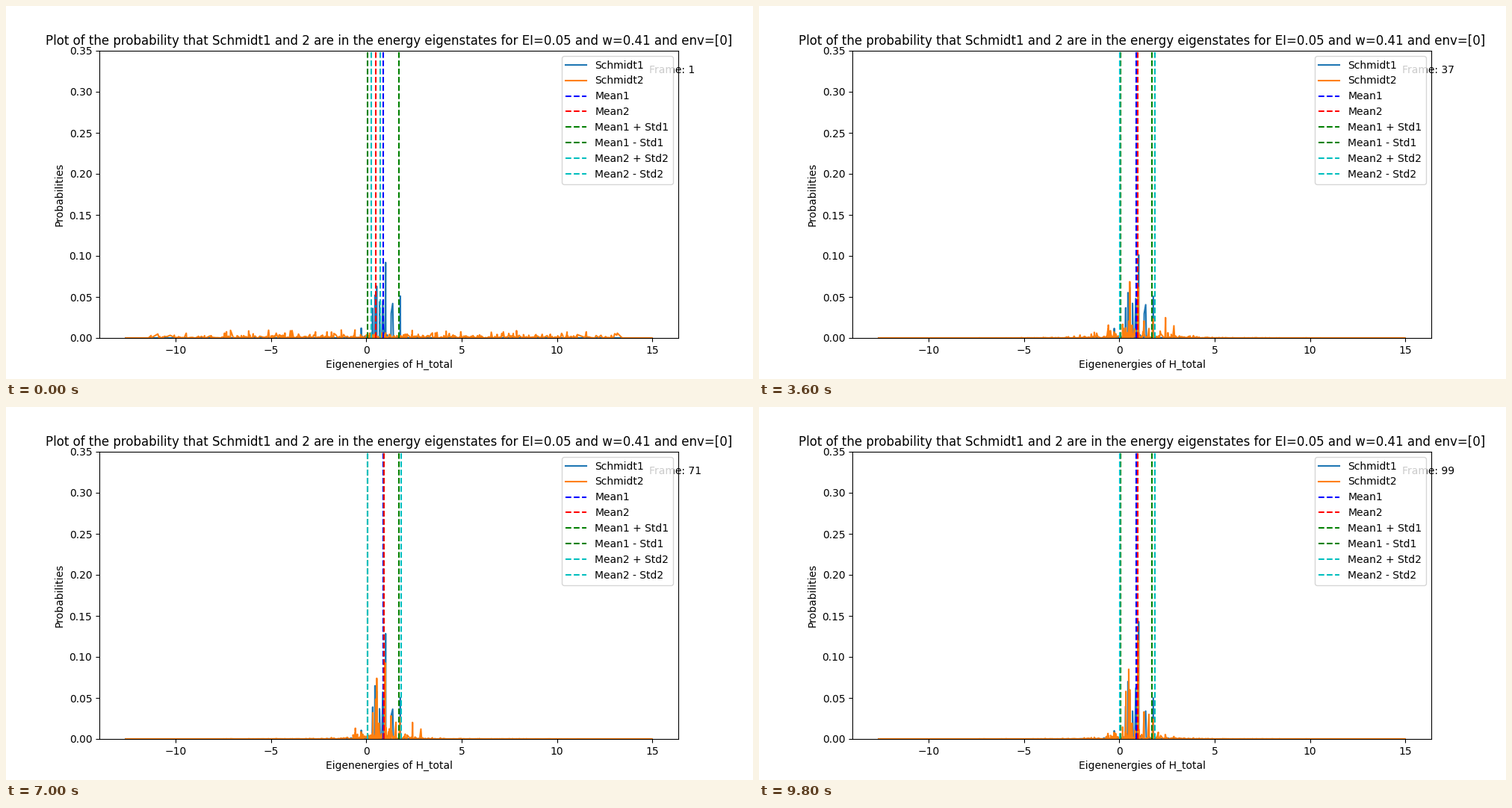
These frames come from a looping animation (1000x500 px, 9.9 s). A matplotlib script:

```python
import numpy as np
import matplotlib.pyplot as plt
from matplotlib.animation import FuncAnimation

FRAMES, INTERVAL = 99, 100
E_MIN, E_MAX = -12.625, 14.98
CENTER = 0.8

# Schmidt1 stays put; the mean of Schmidt2 rises, overshoots and settles
MEAN1, STD1 = 0.88, 0.825
KEYS = np.array([0, 23, 36, 49, 61, 78, 98])
MEAN2 = np.array([0.49, 0.765, 0.945, 1.07, 0.925, 0.96, 0.95])

# Main resonances, energy: probability in thousandths at (start, end)
PEAKS1 = {-0.27: (12, 10), 0.33: (36, 40), 0.45: (52, 70), 0.54: (63, 56), 0.69: (44, 34),
          0.86: (45, 62), 1.01: (92, 143), 1.3: (30, 28), 1.38: (42, 34), 1.78: (51, 50)}
# The same at (middle, end), growing from nothing
PEAKS2 = {-0.58: (19, 4), -0.28: (9, 8), 0.34: (15, 58), 0.49: (25, 85), 0.545: (83, 60),
          0.98: (75, 120), 1.29: (25, 33), 1.55: (14, 30), 1.76: (28, 24), 2.42: (30, 5),
          2.86: (18, 3)}

rng = np.random.default_rng(7)
levels = E_MIN + (E_MAX - E_MIN) * rng.beta(1.8, 1.8, 690)
energies = np.unique(np.concatenate([levels, list(PEAKS1), list(PEAKS2), [E_MIN, E_MAX]]))
distance = np.abs(energies - CENTER)
inside = (energies > -11.3) & (energies < 13.4)
grain, wave_a, wave_b = rng.normal(size=(3, energies.size))
wave_speed = rng.normal(0, 0.06, energies.size)


def smooth(u):
    u = np.clip(u, 0, 1)
    return u * u * (3 - 2 * u)


def mean2_at(step):
    """Smooth curve through the key points of the second mean."""
    slopes = np.gradient(MEAN2, KEYS)
    k = min(np.searchsorted(KEYS, step, side="right") - 1, len(KEYS) - 2)
    span = KEYS[k + 1] - KEYS[k]
    u = (step - KEYS[k]) / span
    return (MEAN2[k] + (MEAN2[k + 1] - MEAN2[k]) * smooth(u)
            + span * u * (1 - u) * ((1 - u) * slopes[k] - u * slopes[k + 1]))


def with_peaks(noise, peaks, heights):
    at = np.searchsorted(energies, list(peaks))
    noise[at] = np.maximum(noise[at], heights)
    return noise / 1000


def schmidt1(step):
    start, end = np.array(list(PEAKS1.values())).T
    noise = 0.8 * np.minimum(grain ** 2, 5) * np.exp(-(distance / 1.5) ** 1.5)
    growth = smooth((step / (FRAMES - 1)) ** 1.3)
    return with_peaks(noise, PEAKS1, start + (end - start) * growth)


def schmidt2(step):
    middle, end = np.array(list(PEAKS2.values())).T
    half = (FRAMES - 1) / 2
    settled = min(step / 23, 1)
    width = 1.3 + 58 * np.exp(-step / 8)
    envelope = ((1.4 + 1.2 * settled) * np.exp(-(distance / width) ** 1.5)
                + 0.25 * settled * np.exp(-distance / 4))
    wave = wave_a * np.cos(wave_speed * step) + wave_b * np.sin(wave_speed * step)
    noise = np.minimum(wave ** 2, 7) * envelope * inside
    heights = middle * smooth(step / half) + (end - middle) * smooth(step / half - 1)
    return with_peaks(noise, PEAKS2, heights)


fig, ax = plt.subplots(figsize=(10, 5), dpi=100)
curve1, = ax.plot(energies, schmidt1(0), label="Schmidt1")
curve2, = ax.plot(energies, schmidt2(0), label="Schmidt2")
markers = [ax.axvline(CENTER, color=color, linestyle="--", label=label)
           for color, label in (("b", "Mean1"), ("r", "Mean2"),
                                ("g", "Mean1 + Std1"), ("g", "Mean1 - Std1"),
                                ("c", "Mean2 + Std2"), ("c", "Mean2 - Std2"))]
counter = ax.text(0.95, 0.95, "", transform=ax.transAxes, va="top")
margin = 0.05 * (E_MAX - E_MIN)
ax.set(xlim=(E_MIN - margin, E_MAX + margin), ylim=(0, 0.35),
       xlabel="Eigenenergies of H_total", ylabel="Probabilities",
       title="Plot of the probability that Schmidt1 and 2 are in the energy "
             "eigenstates for EI=0.05 and w=0.41 and env=[0]")
ax.legend(loc="upper right")


def update(step):
    curve1.set_ydata(schmidt1(step))
    curve2.set_ydata(schmidt2(step))
    mean2 = mean2_at(step)
    offset = mean2 - MEAN2[-1]
    std2 = 0.92 + 1.8 * offset + 0.7 * offset ** 2  # the spread follows the mean
    places = (MEAN1, mean2, MEAN1 + STD1, MEAN1 - STD1, mean2 + std2, mean2 - std2)
    for line, x in zip(markers, places):
        line.set_xdata([x, x])
    counter.set_text(f"Frame: {step + 1}")
    return [curve1, curve2, *markers, counter]


animation = FuncAnimation(fig, update, frames=FRAMES, interval=INTERVAL,
                          repeat=True, repeat_delay=0)
plt.show()
```
